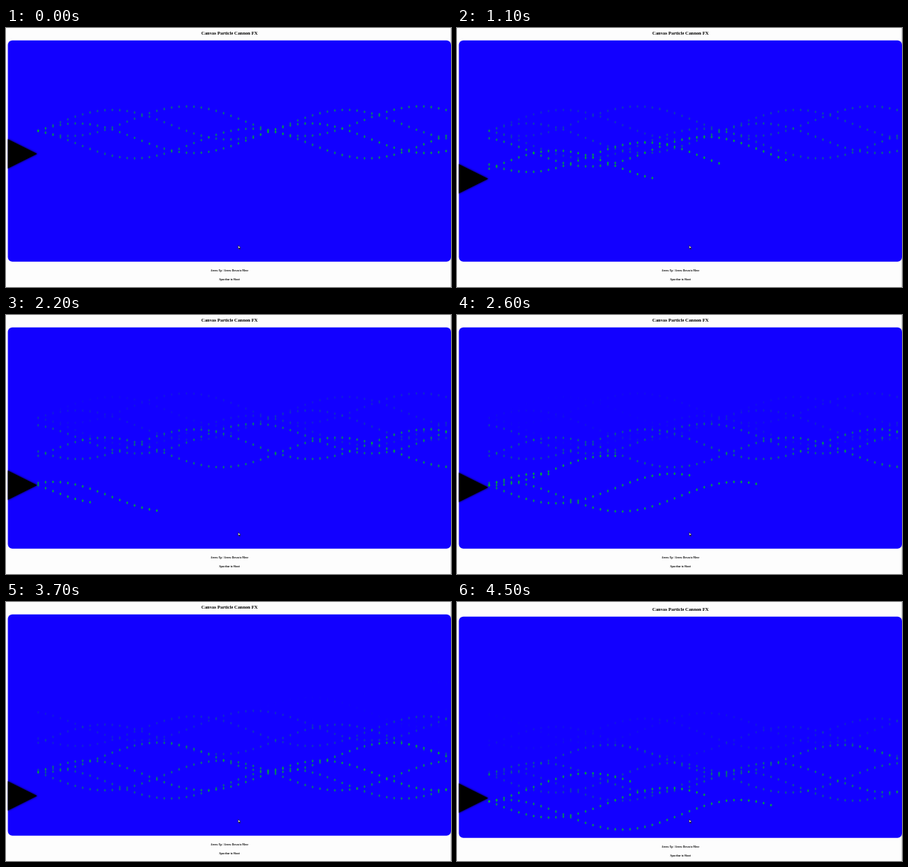
An HTML page with a canvas that plays this animation: 600 px wide and 350 px high, repeating every 4.6 s.

```html
<!DOCTYPE html>
<html lang="en">
<head>
<meta charset="utf-8">
<title>Canvas Particle Cannon FX</title>
<style>
  html, body { margin: 0; width: 100%; height: 100%; overflow: hidden; background: #fdfdfd; }
  canvas, svg { position: absolute; left: 0; top: 0; width: 600px; height: 350px; }
  text { font-family: "Liberation Serif", serif; font-weight: bold; text-anchor: middle; fill: #000; }
</style>
</head>
<body>
<canvas id="stage" width="600" height="350"></canvas>
<svg viewBox="0 0 600 350">
  <g id="labels">
    <text x="301.4" y="9" font-size="6.36">Canvas Particle Cannon FX</text>
    <text x="301.4" y="328.6" font-size="3.57">Arrow Up / Arrow Down to Move</text>
    <text x="301.4" y="341" font-size="3.57">Spacebar to Shoot</text>
  </g>
</svg>
<script>
const ctx = document.getElementById('stage').getContext('2d');
const labels = document.getElementById('labels');

const LOOP = 4600, TICK = 100, STEP_MS = 20, STEP_X = 10, TURN = 0.2, RADIUS = 20;
const LIFE = 4700, RELOAD = 190, MUZZLE = 43, RIGHT = 593;

const stalls = [[500, 800], [1100, 1500], [1500, 1700], [1700, 1900],
                [2000, 2200], [2200, 2500], [2800, 3100], [3700, 4000]];

// Bursts of shots; each shot swings on a circle and has its own crest angle.
const bursts = [
  { at: -1900, y: 139, crests: [2, 4, 5.74, 1.05] },
  { at: 300, y: 149, crests: [5.84] },
  { at: 470, crests: [4.2, 1.8] },
  { at: 1865, crests: [0.4, 4.94, 3.24, 1.35] },
  { at: 3725, y: 266.5, crests: [0.45, 4.8, 2.7] }
];

const ramp = (t, t0, t1) => Math.max(0, Math.min(1, (t - t0) / (t1 - t0)));

// Two steady moves down with a pause between them.
const cannonY = t => 170 + 60 * ramp(t, 0, 1960) + 32 * ramp(t, 2490, 3700);

const shots = bursts.flatMap(({ at, y, crests }) => crests.map((crest, i) => {
  const launch = at + i * RELOAD;
  return { launch, crest, y: y || cannonY(launch) };
}));

function clock(t) {
  const stall = stalls.find(([from, to]) => t >= from && t < to);
  return stall ? stall[0] : Math.floor(t / TICK) * TICK;
}

function poly(points) {
  ctx.beginPath();
  points.forEach(([x, y]) => ctx.lineTo(x, y));
  ctx.closePath();
  ctx.fill();
}

function drawShot(t, { launch, crest, y }) {
  for (let k = 0; MUZZLE + k * STEP_X <= RIGHT; k++) {
    const age = t - launch - k * STEP_MS;
    if (age < 0) break;
    const dy = RADIUS * (Math.cos(crest) - Math.cos(k * TURN - crest));
    ctx.globalAlpha = 0.9 * (1 - ramp(age, 0, LIFE)) ** 1.5;
    ctx.beginPath();
    ctx.ellipse(MUZZLE + 0.4 + k * STEP_X, y + dy, 1.1, 1.8, 0, 0, 7);
    ctx.fill();
  }
  ctx.globalAlpha = 1;
}

function drawCannon(y) {
  ctx.fillStyle = ctx.shadowColor = '#000';
  ctx.shadowBlur = 3;
  poly([[2, y - 20], [42, y], [2, y + 20]]);
  ctx.shadowBlur = 0;
}

function drawPointer() {
  ctx.fillStyle = '#223';
  poly([[312.8, 293.2], [312.8, 298.6], [314, 297.9], [314.8, 299.5], [316, 299], [315.3, 297.4], [316.8, 297]]);
  ctx.fillStyle = '#eee';
  poly([[313.4, 294.5], [313.4, 297.6], [314.4, 297], [315.8, 296.7]]);
}

function draw(t) {
  const shift = 3 * ramp(t, 3900, 4200);
  ctx.fillStyle = '#fdfdfd';
  ctx.fillRect(0, 0, 600, 350);
  ctx.fillStyle = '#dcdcdc';
  ctx.fillRect(599, 0, 1, 350);

  ctx.save();
  ctx.translate(0, shift);
  ctx.beginPath();
  ctx.roundRect(2.5, 16.7, 597.5, 299, 6);
  ctx.clip();
  ctx.fillStyle = '#1200ff';
  ctx.fillRect(0, 0, 600, 350);
  ctx.fillStyle = '#00b828';
  shots.forEach(s => drawShot(t, s));
  drawCannon(cannonY(t));
  ctx.restore();

  drawPointer();
  labels.setAttribute('transform', `translate(0 ${shift})`);
}

const start = performance.now();
function frame() {
  draw(clock((performance.now() - start) % LOOP));
  requestAnimationFrame(frame);
}
frame();
</script>
</body>
</html>
```
